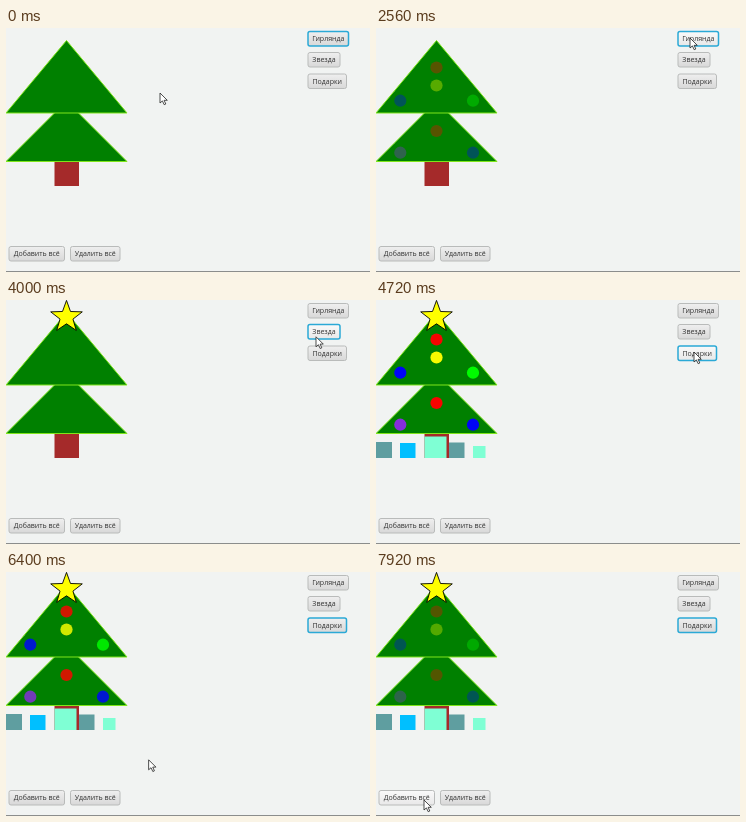
Recreate the animation shown at these times as an HTML page. Size 364 by 244 pixels, loop 8 s.

```html
<!DOCTYPE html>
<html lang="ru">
<head>
<meta charset="utf-8">
<style>
html, body { margin: 0; width: 100%; height: 100%; overflow: hidden; background: #f1f3f2; }
svg { display: block; }
text { font: 7px "Open Sans", "Noto Sans", sans-serif; fill: #333; text-anchor: middle; }
.button rect { fill: url(#face); stroke: #b9bbba; }
.button.hover rect { fill: url(#light); }
.button.focus rect { stroke: #2ba9d6; stroke-width: 1.5; }
</style>
</head>
<body>
<svg id="stage" width="364" height="244" viewBox="0 0 364 244">
  <defs>
    <linearGradient id="face" x2="0" y2="1"><stop stop-color="#efefef"/><stop offset="1" stop-color="#d8d8d8"/></linearGradient>
    <linearGradient id="light" x2="0" y2="1"><stop stop-color="#fafafa"/><stop offset="1" stop-color="#e8e8e8"/></linearGradient>
  </defs>
  <path d="M0 243.5H364" stroke="#8b8d8c"/>
  <path d="M48.5 134h24.5v24h-24.5z" fill="#a52a2a"/>
  <g fill="#008000" stroke="#7fe51a">
    <path d="M60.5 73L121 133.5H0z"/>
    <path d="M60.5 12.5L121 85H0z"/>
  </g>
  <g id="balls"></g>
  <path id="star" fill="#ff0" stroke="#000" stroke-width=".9"/>
  <g id="gifts"></g>
  <g id="buttons"></g>
  <path id="cursor" d="M0 0V10L2.4 7.9L4.2 11.7L5.8 11L4.1 7.3H7.3z" fill="#fff" stroke="#222" stroke-width=".8"/>
</svg>
<script>
const LOOP = 8000, STEP = 80;
const BALLS_AT = 2240, STAR_AT = 3200, GIFTS_AT = 4560;
const FADE_START = 2220, FADE_PERIOD = 1790;

const $ = id => document.getElementById(id);
const add = (parent, tag, attrs) => {
  const node = document.createElementNS("http://www.w3.org/2000/svg", tag);
  for (const key in attrs) node.setAttribute(key, attrs[key]);
  return parent.appendChild(node);
};

for (const [cx, cy, fill] of [
  [60.5, 39.5, "red"], [60.5, 57.5, "yellow"], [24.3, 72.7, "blue"], [97, 72.7, "lime"],
  [60.5, 103, "red"], [24.3, 124.7, "blueviolet"], [97, 124.7, "blue"]
]) add($("balls"), "circle", { cx, cy, r: 6.1, fill });

for (const [x, y, width, fill] of [
  [0, 142, 16, "cadetblue"], [24, 143, 15.5, "deepskyblue"], [48.5, 136.5, 22, "aquamarine"],
  [73, 142.5, 15.5, "cadetblue"], [97, 146, 12.5, "aquamarine"]
]) add($("gifts"), "rect", { x, y, width, height: 158 - y, fill });

const starPoints = Array.from({ length: 10 }, (_, i) => {
  const r = i % 2 ? 6.8 : 16.6, a = i * Math.PI / 5;
  return `${60.5 + r * Math.sin(a)} ${17 - r * Math.cos(a)}`;
});
$("star").setAttribute("d", `M${starPoints.join("L")}z`);

const buttons = [
  ["Гирлянда", 302, 3.5, 40.5], ["Звезда", 302, 24.5, 32], ["Подарки", 302, 46, 38.5],
  ["Добавить всё", 3, 218.5, 55.5], ["Удалить всё", 64.5, 218.5, 49.5]
].map(([label, x, y, width]) => {
  const node = add($("buttons"), "g", { class: "button" });
  add(node, "rect", { x, y, width, height: 14.5, rx: 2 });
  add(node, "text", { x: x + width / 2, y: y + 9.9 }).textContent = label;
  return { node, contains: (px, py) => px >= x && px <= x + width && py >= y && py <= y + 14.5 };
});

// Pointer path: time, x, y
const path = [
  [0, 154, 65], [480, 323, 22], [720, 323, 22], [800, 312, 21], [960, 312, 21],
  [1120, 306, 16], [1200, 306, 16], [1280, 303, 11], [1360, 303, 11], [1440, 305, 11],
  [1520, 305, 11], [1600, 314, 10], [2560, 314, 10], [3040, 308, 33], [3920, 308, 33],
  [4320, 318, 52], [5280, 318, 52], [5760, 283, 86], [6640, 90, 226], [7040, 64, 231],
  [7200, 60, 225], [7520, 48, 228], [LOOP, 48, 228]
];

function pointerAt(t) {
  const i = path.findIndex(p => p[0] > t);
  const [t0, x0, y0] = path[i - 1], [t1, x1, y1] = path[i];
  const k = (t - t0) / (t1 - t0);
  return [x0 + (x1 - x0) * k, y0 + (y1 - y0) * k];
}

function ballOpacity(t) {
  if (t < BALLS_AT) return 0;
  const wave = (1 - Math.cos((t - FADE_START) / FADE_PERIOD * 2 * Math.PI)) / 2;
  return Math.min(1, wave * 1.08);
}

const show = (id, visible) => $(id).setAttribute("visibility", visible ? "visible" : "hidden");

function draw(now) {
  const t = Math.floor(now % LOOP / STEP) * STEP;
  const [x, y] = pointerAt(t);
  const focused = t < 3120 ? 0 : t < 4480 ? 1 : 2;
  $("cursor").setAttribute("transform", `translate(${x} ${y})`);
  for (const ball of $("balls").children) ball.setAttribute("opacity", ballOpacity(t));
  show("star", t >= STAR_AT);
  show("gifts", t >= GIFTS_AT);
  buttons.forEach(({ node, contains }, i) => {
    node.classList.toggle("hover", contains(x, y));
    node.classList.toggle("focus", i === focused);
  });
}

const start = performance.now();
function tick() {
  draw(performance.now() - start);
  requestAnimationFrame(tick);
}
tick();
</script>
</body>
</html>
```
